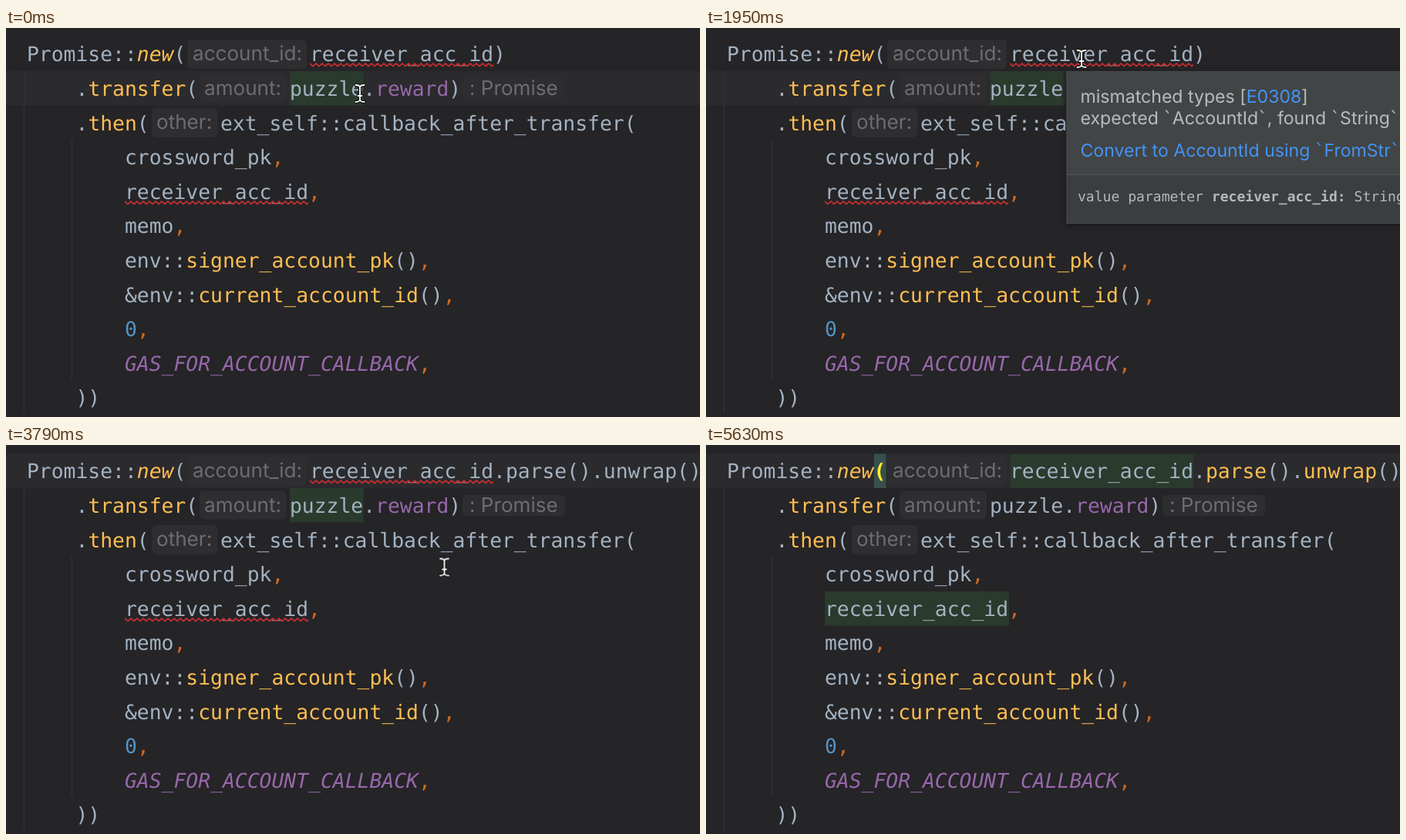
Animation of 900x505 px, one loop 5.68 s. Source, as an HTML page:

```html
<!DOCTYPE html>
<html lang="en">
<head>
<meta charset="utf-8">
<title>Quick fix in the editor</title>
<style>
  html, body { margin: 0; width: 100%; height: 100%; overflow: hidden; background: #252427; }
  svg { display: block; width: 100vw; height: 100vh; }
  text { white-space: pre; text-rendering: geometricPrecision; font-variant-ligatures: none; }

  .code { font: 26.36px "DejaVu Sans Mono", "Noto Sans Mono", monospace; fill: #a3b3c2; }
  .fn { fill: #ffbf52; }
  .it { font-style: italic; }
  .field { fill: #9768aa; }
  .sep { fill: #d0691f; }
  .num { fill: #5394c4; }
  .brace { fill: #ffef28; font-weight: 700; }

  .hint { font: 26.1px Inter, "Open Sans", sans-serif; fill: #6d6d70; }
  .chip { fill: #2e2d30; }
  .row { fill: #2b2a2d; }
  .usage { fill: #2a3a2d; }
  .guide { stroke: #343337; stroke-width: 1.2; }

  .msg { font: 23.1px Inter, "Open Sans", sans-serif; fill: #b9bbbd; }
  .tick { font-family: "DejaVu Sans", sans-serif; }
  .doc { font: 18.06px "DejaVu Sans Mono", "Noto Sans Mono", monospace; fill: #b4b8bb; }
  .link { fill: #4394f5; }
  .bold { font-weight: 700; }
  .tip { filter: drop-shadow(0 2px 4px #0005); }

  .before, .after, .stale, .fresh, .tip, .over, .beam, .hand {
    animation: 5680ms step-end infinite;
  }
  .before { animation-name: before; }
  .after  { animation-name: after; }
  .stale  { animation-name: stale; }
  .fresh  { animation-name: fresh; }
  .tip    { animation-name: tip; }
  .over, .hand { animation-name: over; }
  .beam   { animation-name: beam; }
  .late   { animation: late 5680ms step-end infinite; }
  .mouse  { animation: mouse 5680ms linear infinite; }

  /* fix applied at 3180 ms, code analysed again at 3800 ms */
  @keyframes before { 0% { visibility: visible } 55.99%, 100% { visibility: hidden } }
  @keyframes after  { 0% { visibility: hidden } 55.99%, 100% { visibility: visible } }
  @keyframes stale  { 0% { visibility: visible } 66.9%, 100% { visibility: hidden } }
  @keyframes fresh  { 0% { visibility: hidden } 66.9%, 100% { visibility: visible } }
  @keyframes late   { 0% { fill: #a3b3c2 } 66.9%, 100% { fill: #ffbf52 } }
  @keyframes tip {
    0% { visibility: hidden } 32.57% { visibility: visible } 55.99%, 100% { visibility: hidden }
  }
  @keyframes over {
    0% { visibility: hidden } 47.54% { visibility: visible } 55.99%, 100% { visibility: hidden }
  }
  @keyframes beam {
    0% { visibility: visible } 47.54% { visibility: hidden }
    55.99% { visibility: visible } 86.27%, 100% { visibility: hidden }
  }
  @keyframes mouse {
    0%, 12.32% { transform: translate(459px, 85px) }
    17.6% { transform: translate(464.5px, 71.5px) }
    21.13% { transform: translate(487px, 40px) }
    40.85% { transform: translate(487px, 40px); animation-timing-function: ease-in-out }
    49.3%, 100% { transform: translate(568.5px, 158.5px) }
  }
</style>
</head>
<body>
<svg viewBox="0 0 900 505" preserveAspectRatio="none">
  <defs>
    <pattern id="wave" width="8" height="6" patternUnits="userSpaceOnUse">
      <path d="M-2 0.5L0 1L4 4.6L8 1L10 0.5" fill="none" stroke="#c62d2f" stroke-width="1.7"/>
    </pattern>
    <path id="ibeam" d="M-5.5 -11Q-1 -11 0 -8.5Q1 -11 5.5 -11M0 -8.5V8.5M-5.5 11Q-1 11 0 8.5Q1 11 5.5 11M-2.5 3H2.5" fill="none"/>
  </defs>

  <rect width="900" height="505" fill="#252427"/>
  <rect class="row before" y="56" width="900" height="44.5"/>
  <rect class="row after" y="11.5" width="900" height="44.5"/>
  <path class="guide" d="M23.5 56V500M85.5 145V456"/>

  <rect class="usage stale" x="368" y="56" width="95.5" height="44.5"/>
  <g class="fresh">
    <rect class="usage" x="394.5" y="11.5" width="238" height="44.5"/>
    <rect class="usage" x="154" y="190" width="239" height="44.5"/>
    <rect x="218" y="11.5" width="15.5" height="44.5" fill="#38504d"/>
  </g>

  <g class="chip">
    <rect x="235" y="15" width="155" height="38" rx="6"/>
    <rect x="251" y="59.5" width="113" height="37" rx="6"/>
    <rect x="592" y="65" width="133" height="27" rx="5"/>
    <rect x="189" y="104" width="85.5" height="38" rx="6"/>
  </g>
  <g class="hint">
    <text x="242" y="42">account_id:</text>
    <text x="257" y="86.6">amount:</text>
    <text x="601" y="86.6">: Promise</text>
    <text x="195" y="131.2">other:</text>
  </g>

  <g class="code">
    <text x="27" y="43.3">Promise::<tspan class="fn it">new</tspan></text>
    <text class="stale" x="217.5" y="43.3">(</text>
    <text class="brace fresh" x="217.5" y="43.3">(</text>
    <text x="394" y="43.3">receiver_acc_id</text>
    <text class="before" x="632" y="43.3">)</text>
    <text class="after" x="632" y="43.3">.<tspan class="late">parse</tspan>().<tspan class="late">unwrap</tspan>())</text>

    <text x="90.5" y="87.9">.<tspan class="fn">transfer</tspan>(</text>
    <text x="368" y="87.9">puzzle.<tspan class="field">reward</tspan>)</text>
    <text x="90.5" y="132.5">.<tspan class="fn">then</tspan>(</text>
    <text x="278" y="132.5">ext_self::callback_after_transfer(</text>

    <text x="154" y="177.1">crossword_pk<tspan class="sep">,</tspan></text>
    <text x="154" y="221.7">receiver_acc_id<tspan class="sep">,</tspan></text>
    <text x="154" y="266.3">memo<tspan class="sep">,</tspan></text>
    <text x="154" y="310.9">env::<tspan class="fn">signer_account_pk</tspan>()<tspan class="sep">,</tspan></text>
    <text x="154" y="355.5">&amp;env::<tspan class="fn">current_account_id</tspan>()<tspan class="sep">,</tspan></text>
    <text x="154" y="400.1"><tspan class="num">0</tspan><tspan class="sep">,</tspan></text>
    <text x="154" y="444.7"><tspan class="field it">GAS_FOR_ACCOUNT_CALLBACK</tspan><tspan class="sep">,</tspan></text>
    <text x="90.5" y="489.3">))</text>
  </g>

  <g class="stale" fill="url(#wave)">
    <rect width="238" height="6" transform="translate(394 45)"/>
    <rect width="238" height="6" transform="translate(154 224)"/>
  </g>

  <g class="tip">
    <rect x="467.5" y="56" width="440" height="198" fill="#3b3e41"/>
    <rect x="467.5" y="56" width="440" height="134" fill="#424546"/>
    <path d="M468 190.5H900" stroke="#55585a"/>
    <rect x="468" y="56.5" width="440" height="197" fill="none" stroke="#484b4d"/>
    <g class="msg">
      <text x="485.5" y="96.5">mismatched types [<tspan class="link">E0308</tspan>]</text>
      <text x="485.5" y="124.5">expected <tspan class="tick">`</tspan>AccountId<tspan class="tick">`</tspan>, found <tspan class="tick">`</tspan>String<tspan class="tick">`</tspan></text>
      <text class="link" x="485.5" y="166.5">Convert to AccountId using <tspan class="tick">`</tspan>FromStr<tspan class="tick">`</tspan></text>
    </g>
    <path class="over" d="M486 169.5H899" stroke="#4394f5" stroke-width="1.6"/>
    <text class="doc" x="482" y="224.5">value parameter <tspan class="bold">receiver_acc_id:</tspan> String</text>
  </g>

  <g class="mouse">
    <g class="beam" stroke-linecap="round">
      <use href="#ibeam" stroke="#111" stroke-width="4"/>
      <use href="#ibeam" stroke="#fff" stroke-width="1.8"/>
    </g>
    <g class="hand" stroke="#111" stroke-width="1.3" stroke-linejoin="round">
      <path fill="#fff" d="M-3 0Q-1 -3 1 0L2.5 6Q5 4.5 6 7Q8.5 6 9.5 8.5Q12 8 12.5 11Q13 15 11 18V20H1.5V18L-5.5 11Q-6.5 8 -3.5 8.5L-1 10Z"/>
      <path fill="none" d="M3.5 13V17M6 13V17M8.5 13V17"/>
    </g>
  </g>
</svg>
</body>
</html>
```
